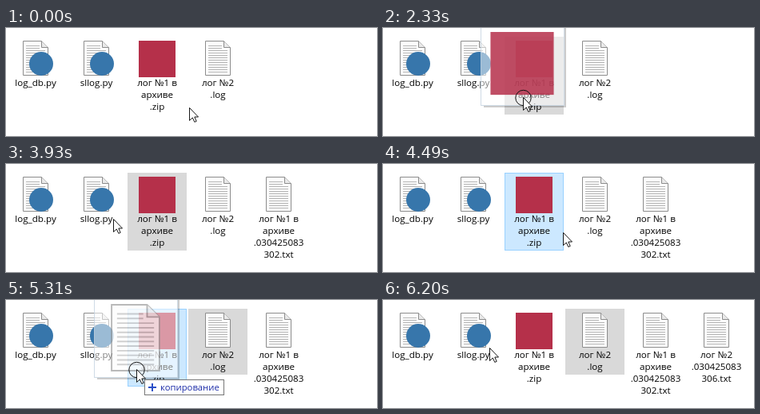
These frames come from a looping animation (464 by 136 pixels, 9200 ms). An HTML page:

```html
<!DOCTYPE html>
<html lang="ru">
<head>
<meta charset="utf-8">
<title>Drag and drop</title>
<style>
html, body { margin: 0; width: 100%; height: 100%; overflow: hidden; background: #fff; }
svg { display: block; width: 464px; height: 136px; }
text { font: 11.6px "Open Sans", "Noto Sans", sans-serif; fill: #000; }
#tip text { font-size: 11.3px; fill: #1c2ca8; }
.none { fill: none; }
.plain { fill: #cce8ff; }
.active { fill: #cce8ff; stroke: #99d1ff; }
.idle { fill: #d9d9d9; stroke: #d9d9d9; }
</style>
</head>
<body>
<svg viewBox="0 0 464 136">
  <defs>
    <g id="sheet">
      <path d="M-15.5 .5H7.5L15.5 8.5V43.5H-15.5Z" fill="#fdfdfd" stroke="#8c8c8c"/>
      <path d="M7.5 .5V8.5H15.5" fill="#e9e9e9" stroke="#8c8c8c"/>
      <path id="lines" stroke="#b2b2b2"/>
    </g>
    <g id="script">
      <use href="#sheet"/>
      <circle cx="7" cy="29" r="15" fill="#3776ab"/>
    </g>
    <rect id="archive" x="-23" width="46" height="46" fill="#b5304a"/>
  </defs>
  <g id="files"></g>
  <g id="ghost">
    <path d="M53 -94V12H-49" fill="none" stroke="#000" stroke-width="2" opacity=".2"/>
    <rect x="-52.5" y="-97.5" width="104" height="108" fill="#fff" fill-opacity=".5" stroke="#c3d3e0" stroke-opacity=".8"/>
    <use id="ghostIcon"/>
  </g>
  <g id="tip">
    <rect id="tipBox" x="10.5" y="13.5" height="19" fill="#fff" stroke="#767676"/>
    <path id="tipSign" fill="none" stroke="#2a50c8"/>
    <text id="tipText" x="30" y="27"></text>
  </g>
  <g id="pointer">
    <circle id="ring" cx=".5" cy="1" r="9.7" fill="none" stroke="#111"/>
    <path d="M.5 .5V16.5L4.3 13L6.8 18.4L9.2 17.4L6.8 12H11.5Z" fill="#fff" stroke="#000" stroke-width=".9"/>
  </g>
</svg>
<script>
const LOOP = 9200;
const PITCH = 76;
const STEP = 138;
const $ = id => document.getElementById(id);
const show = (el, on) => el.setAttribute("display", on ? "inline" : "none");
const move = (el, x, y, scale = 1) =>
  el.setAttribute("transform", `translate(${x} ${y}) scale(${scale})`);

function add(parent, tag, attrs, text = "") {
  const el = document.createElementNS("http://www.w3.org/2000/svg", tag);
  for (const key in attrs) el.setAttribute(key, attrs[key]);
  el.textContent = text;
  return parent.appendChild(el);
}

$("lines").setAttribute("d", Array.from({ length: 12 }, (_, i) =>
  `M-12 ${6.5 + i * 3}H${i < 2 ? 5 : 12}`).join(""));

const files = [
  { icon: "script", label: "log_db.py" },
  { icon: "script", label: "sllog.py" },
  { icon: "archive", label: "лог №1 в|архиве|.zip" },
  { icon: "sheet", label: "лог №2|.log" },
  { icon: "sheet", label: "лог №1 в|архиве|.030425083|302.txt", since: 3330 },
  { icon: "sheet", label: "лог №2|.030425083|306.txt", since: 6200 }
];
const [, script, archive, log] = files;

files.forEach((file, column) => {
  const lines = file.label.split("|");
  file.group = add($("files"), "g", { transform: `translate(${column * PITCH} 0)` });
  file.back = add(file.group, "rect", {
    x: .5, y: 11.5, width: 73, height: 52 + lines.length * 15, class: "none"
  });
  add(file.group, "use", { href: "#" + file.icon, transform: "translate(37 16)" });
  lines.forEach((line, i) =>
    add(file.group, "text", { x: 37, y: 73 + i * 15, "text-anchor": "middle" }, line));
});

// Key points are [step, x, y]; the pointer is redrawn once per STEP.
const gestures = [
  { start: 0, path: [[0, 229, 100]] },
  { start: 1480, path: [[0, 225, 93], [3, 205, 74], [5, 201, 86], [6, 175, 87], [8, 134, 72], [10, 133, 68]] },
  { start: 3910, path: [[0, 134, 69], [2, 174, 92], [4, 225, 86], [5, 273, 86], [8, 249, 88], [9, 197, 93], [10, 163, 87], [11, 149, 72], [13, 133, 60]] }
];

const drags = [
  { file: archive, press: 2030, lift: 2170, drop: 3130, refocus: 4080, scale: 1.72, opacity: .85 },
  { file: log, press: 4790, lift: 5024, drop: 6000, refocus: LOOP, scale: 1.93, opacity: .6 }
];

const tips = {
  open: { text: "Open with sllog.py", width: 126, sign: "M15 23H26M21.5 18.5L26 23L21.5 27.5", weight: 1.4 },
  copy: { text: "копирование", width: 99, sign: "M15 23H25M20 18V28", weight: 2 }
};

function pointerAt(t) {
  const { start, path } = gestures.findLast(g => t >= g.start);
  const step = Math.floor((t - start) / STEP);
  const from = path.findLast(p => p[0] <= step);
  const to = path.find(p => p[0] > step) || from;
  const part = to === from ? 0 : (step - from[0]) / (to[0] - from[0]);
  return [1, 2].map(axis => Math.round(from[axis] + (to[axis] - from[axis]) * part));
}

function showTip(tip, x, y) {
  show($("tip"), tip);
  if (!tip) return;
  move($("tip"), x, y);
  $("tipBox").setAttribute("width", tip.width);
  $("tipSign").setAttribute("d", tip.sign);
  $("tipSign").setAttribute("stroke-width", tip.weight);
  $("tipText").textContent = tip.text;
}

function render(t) {
  const [x, y] = pointerAt(t);
  const drag = drags.findLast(d => t >= d.press);
  const pressed = drag && t < drag.drop;
  const lifted = pressed && t >= drag.lift;
  const hovered = files[Math.floor(x / PITCH)];
  const target = lifted && hovered !== drag.file ? hovered : null;

  for (const file of files) {
    show(file.group, t >= (file.since || 0));
    let look = file === target ? "active" : "none";
    if (drag && file === drag.file) {
      const unfocused = t >= drag.lift && t < drag.refocus;
      look = unfocused ? "idle" : file === hovered ? "active" : "plain";
    }
    file.back.setAttribute("class", look);
  }

  show($("ghost"), lifted);
  if (lifted) {
    move($("ghost"), x, y);
    $("ghostIcon").setAttribute("href", "#" + drag.file.icon);
    $("ghostIcon").setAttribute("opacity", drag.opacity);
    move($("ghostIcon"), -1, -82, drag.scale);
  }
  showTip(target && (target === script ? tips.open : tips.copy), x, y);
  move($("pointer"), x, y);
  show($("ring"), pressed);
}

const start = performance.now();
function tick() {
  render((performance.now() - start) % LOOP);
  requestAnimationFrame(tick);
}
tick();
</script>
</body>
</html>
```
